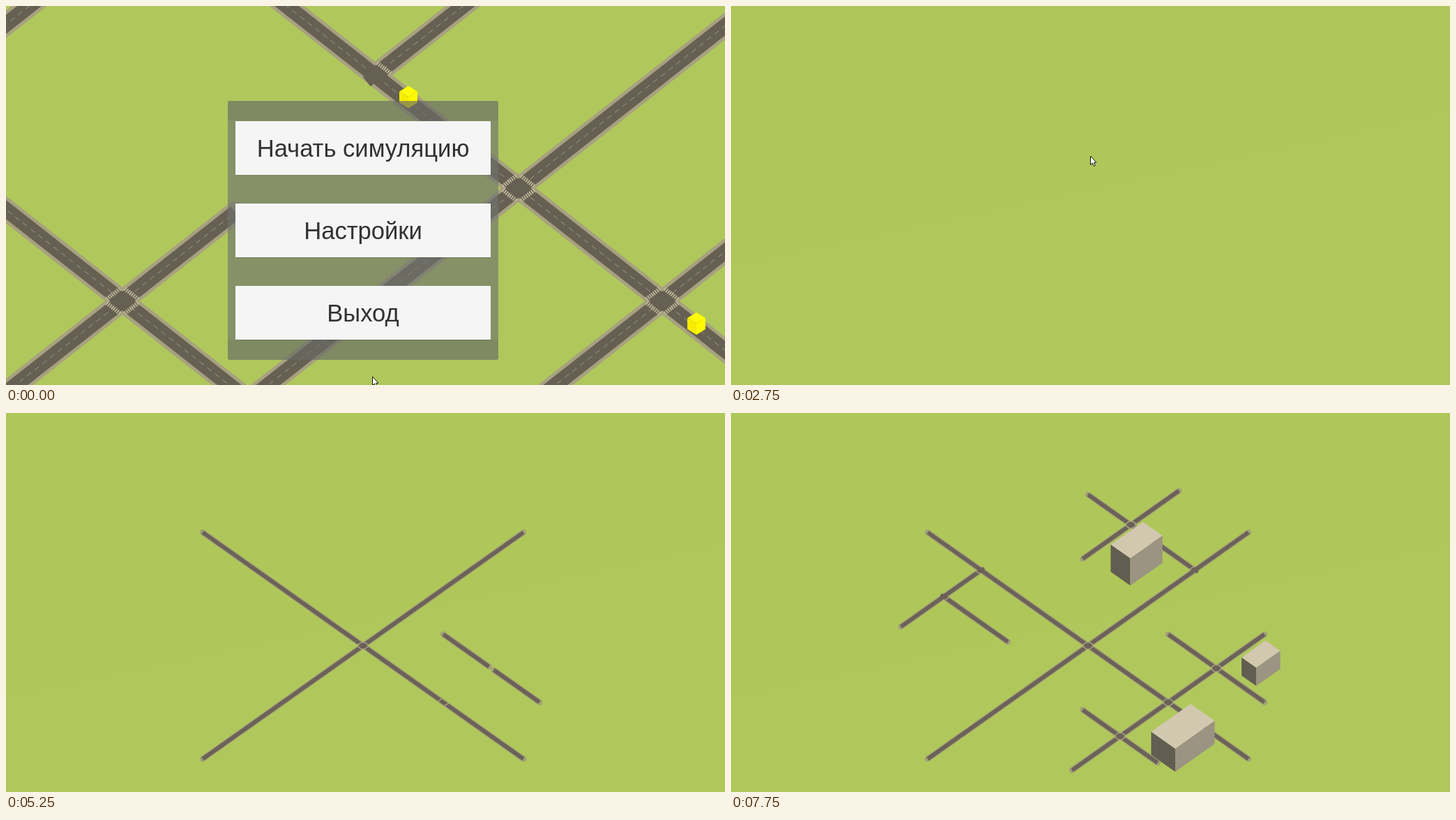
Recreate the animation shown at these times as an HTML page with a canvas. Size 1031 px wide and 543 px high, loop 8000 ms.

```html
<!DOCTYPE html>
<html lang="ru">
<head>
<meta charset="utf-8">
<style>
html, body { margin: 0; width: 100%; height: 100%; overflow: hidden; background: #b0c85b; }
canvas { display: block; }
</style>
</head>
<body>
<canvas id="stage" width="1031" height="543"></canvas>
<script>
const ctx = document.getElementById('stage').getContext('2d');
const LOOP = 8000, STEP = 250, CITY_START = 2750, SPEED = 0.5165;

// Grid axes: u runs down-right, v runs up-right. A road lies on one axis at a fixed value of the other.
const road = (axis, fixed, from, to) => ({ axis, fixed, from, to });

const menu = {
  x: 735, y: 261, ux: 1, uy: 0.785,
  curb: 31, asphalt: 21.5, dash: [8, 6],
  walk: { away: 13, half: 9.5, width: 6, dash: [1.7, 1.5], color: '#c3bc9d' },
  curbColor: '#a7a17f', color: '#656052', dashColor: '#a09b87',
  roads: [
    road('u', 0, -600, 400), road('v', 0, -600, 400), road('v', 206, -250, 250), road('v', -206, 0, 300),
    road('u', -387, -500, 100), road('v', -181, -700, -225), road('v', -517, -300, -100)
  ]
};

const city = {
  x: 512, y: 333.3, ux: 7.667, uy: 5.41,
  curb: 8.5, asphalt: 5.8, dash: [2, 2],
  walk: { away: 0.6, half: 0.4, width: 1.2, dash: [], color: '#b9b18c' },
  curbColor: '#a3a077', color: '#6a6158', dashColor: '#746b60',
  // In building order
  roads: [
    road('u', 0, 0, 30), road('v', 0, 0, -30), road('v', 0, 0, 30), road('u', 0, 0, -30),
    road('u', 9, 6, 24), road('u', -9, 8, 22), road('v', 15, 18, -18), road('u', 20, -20, 0),
    road('v', -12, 29, 11), road('u', -7, -20, -8), road('v', -20, -15, 0)
  ]
};

// Front corner on the grid, size, height
const buildings = [[-7.6, 15.5, 3.67, 39], [18.65, 12.8, 2.74, 26], [21.8, -5.5, 4.5, 33]];
const cursorPath = [
  [0, 525, 531], [500, 530, 440], [1250, 515, 215], [3250, 515, 215], [4250, 936, 273], [4750, 1019, 285]
];

const between = (n, a, b) => n >= Math.min(a, b) && n <= Math.max(a, b);

function point(scene, axis, along, fixed) {
  const [u, v] = axis === 'u' ? [along, fixed] : [fixed, along];
  return [scene.x + (u + v) * scene.ux, scene.y + (u - v) * scene.uy];
}

const hasRoad = (scene, axis, along, fixed) =>
  scene.roads.some(r => r.axis === axis && r.fixed === fixed && between(along, r.from, r.to));

// Places where other roads meet this one, in driving order
function junctions(scene, r) {
  const hits = scene.roads.filter(o =>
    o.axis !== r.axis && between(o.fixed, r.from, r.to) && between(r.fixed, o.from, o.to));
  const dir = Math.sign(r.to - r.from);
  return [...new Set(hits.map(o => o.fixed))].sort((a, b) => (a - b) * dir);
}

function poly(color, ...pts) {
  ctx.fillStyle = color;
  ctx.beginPath();
  for (const [x, y] of pts) ctx.lineTo(x, y);
  ctx.closePath();
  ctx.fill();
}

function rect(color, x, y, w, h) {
  ctx.fillStyle = color;
  ctx.fillRect(x, y, w, h);
}

function line([a, b], width, color, cap = 'butt', dash = []) {
  ctx.lineWidth = width;
  ctx.strokeStyle = color;
  ctx.lineCap = cap;
  ctx.setLineDash(dash);
  ctx.beginPath();
  ctx.moveTo(...a);
  ctx.lineTo(...b);
  ctx.stroke();
  ctx.setLineDash([]);
}

// A road gets crosswalks only where the other road runs through
function drawCrosswalks(scene, r) {
  const other = r.axis === 'u' ? 'v' : 'u';
  const { away, half, width, dash, color } = scene.walk;
  for (const j of junctions(scene, r)) {
    if (![-1, 1].every(d => hasRoad(scene, other, r.fixed + d, j))) continue;
    for (const side of [-away, away]) {
      if (!between(j + side, r.from, r.to)) continue;
      const ends = [-half, half].map(w => point(scene, r.axis, j + side, r.fixed + w));
      line(ends, width, color, 'butt', dash);
    }
  }
}

function drawRoads(scene, done, strips = []) {
  const all = done.map(r => [r.from, r.to].map(s => point(scene, r.axis, s, r.fixed))).concat(strips);
  for (const s of all) line(s, scene.curb, scene.curbColor, 'round');
  for (const s of all) line(s, scene.asphalt, scene.color);
  for (const s of all) line(s, 1, scene.dashColor, 'butt', scene.dash);
  const clear = scene.walk.away * 0.9;
  for (const r of done) {
    for (const j of junctions(scene, r)) {
      line([-clear, clear].map(d => point(scene, r.axis, j + d, r.fixed)), scene.asphalt * 0.8, scene.color);
    }
  }
  for (const r of done) drawCrosswalks(scene, r);
}

function cube(x, y) {
  poly('#fffc08', [x, y - 16], [x + 13, y - 8], [x, y], [x - 13, y - 8]);
  poly('#f7ec00', [x - 13, y - 8], [x, y], [x, y + 16], [x - 13, y + 8]);
  poly('#fffa00', [x + 13, y - 8], [x, y], [x, y + 16], [x + 13, y + 8]);
}

function drawMenu(pressed) {
  drawRoads(menu, menu.roads);
  cube(577, 130.5);
  cube(990, 455);

  ctx.fillStyle = 'rgba(113,115,110,.65)';
  ctx.beginPath();
  ctx.roundRect(318, 136, 388, 371, 3);
  ctx.fill();
  rect('rgba(0,0,0,.05)', 318, 136, 388, 28);
  rect('rgba(0,0,0,.05)', 318, 478, 388, 29);

  ctx.font = '34.6px "Liberation Sans", Arial, sans-serif';
  ctx.textAlign = 'center';
  ['Начать симуляцию', 'Настройки', 'Выход'].forEach((label, i) => {
    const y = Math.round(165.3 + i * 117.7);
    rect('rgba(50,55,40,.4)', 329, y, 366, 77.5);
    rect(pressed && i === 0 ? '#c1c1c1' : '#f5f5f5', 329, y, 366, 77);
    ctx.fillStyle = '#323232';
    ctx.fillText(label, 512, y + 51);
  });
}

// Pieces of a road under construction; the last piece of a split road grows back from its end
function growingPieces(scene, r, budget, unit) {
  const cuts = junctions(scene, r), dir = Math.sign(r.to - r.from);
  const stops = [...new Set([r.from, ...cuts, r.to])];
  const pieces = [];
  for (let i = 1; i < stops.length && budget > 0; i++) {
    const trim = s => cuts.includes(s) ? 0.45 : 0;
    const a = stops[i - 1] + trim(stops[i - 1]) * dir, b = stops[i] - trim(stops[i]) * dir;
    const grown = Math.min(Math.abs(b - a), budget / unit) * dir;
    const back = i > 1 && i === stops.length - 1;
    const ends = back ? [b, b - grown] : [a, a + grown];
    pieces.push(ends.map(s => point(scene, r.axis, s, r.fixed)));
    budget -= Math.abs(stops[i] - stops[i - 1]) * unit;
  }
  return pieces;
}

function drawBuilding([u, v, size, h]) {
  const [front, left, right, back] = [[0, 0], [-size, 0], [0, size * 1.64], [-size, size * 1.64]]
    .map(([du, dv]) => point(city, 'u', u + du, v + dv));
  const down = ([x, y]) => [x, y + h];
  poly('#d2c8b0', front, left, back, right);
  poly('#625d51', front, left, down(left), down(front));
  poly('#9b9482', front, right, down(right), down(front));
}

function drawCity(t) {
  const drop = t < 3000 ? 0 : 36;
  poly('#afc759', [0, 0], [1031, 0], [1031, 150 + drop], [0, 371 + drop]);

  const unit = Math.hypot(city.ux, city.uy), done = [];
  let budget = (t - CITY_START) * SPEED, strips = [];
  for (const r of city.roads) {
    if (budget <= 0) break;
    const len = Math.abs(r.to - r.from) * unit;
    if (budget >= len) done.push(r);
    else strips = growingPieces(city, r, budget, unit);
    budget -= len;
  }
  drawRoads(city, done, strips);
  buildings.forEach((b, i) => { if (t >= 7450 + i * 125) drawBuilding(b); });
}

function drawCursor(t) {
  const i = cursorPath.findIndex(p => p[0] >= t);
  if (i < 0) return;
  const [t1, x1, y1] = cursorPath[i], [t0, x0, y0] = cursorPath[Math.max(0, i - 1)];
  const k = t1 > t0 ? (t - t0) / (t1 - t0) : 1;
  ctx.save();
  ctx.translate(x0 + (x1 - x0) * k + 0.5, y0 + (y1 - y0) * k);
  poly('#fff', [0, 0], [0, 12.5], [2.8, 10], [4.8, 14.5], [6.8, 13.6], [4.9, 9.3], [8.4, 9.2]);
  ctx.lineWidth = 1;
  ctx.strokeStyle = '#111';
  ctx.stroke();
  ctx.restore();
}

function frame(now) {
  const t = Math.floor(now % LOOP / STEP) * STEP;
  rect('#b0c85b', 0, 0, 1031, 543);
  if (t < CITY_START) drawMenu(t >= 2500);
  else drawCity(t);
  drawCursor(t);
  requestAnimationFrame(frame);
}
requestAnimationFrame(frame);
</script>
</body>
</html>
```
